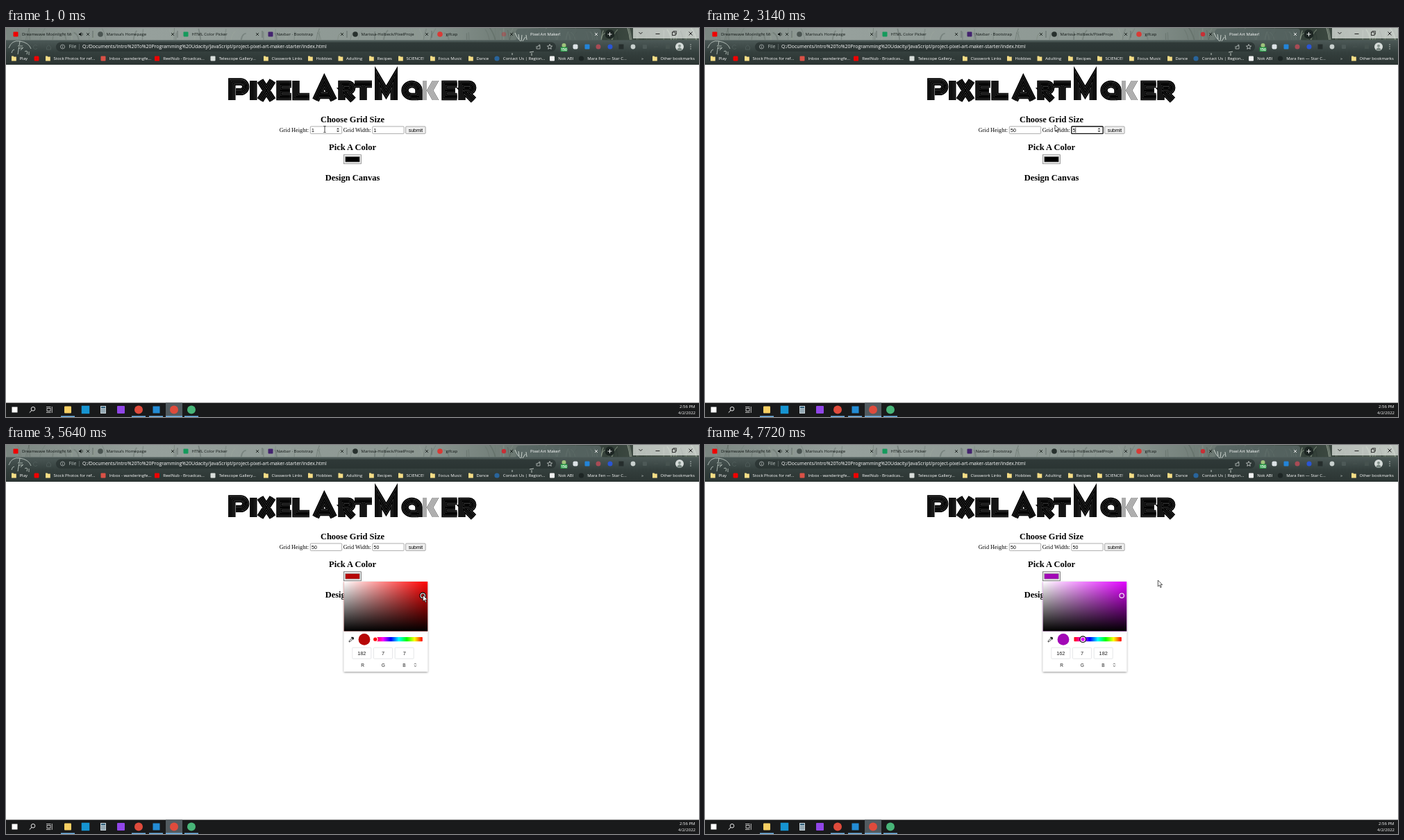
An HTML page for the animation above (7.99 s loop, 998x561 px).

```html
<!DOCTYPE html>
<html lang="en">
<head>
<meta charset="utf-8">
<title>Pixel Art Maker!</title>
<style>
html, body { margin: 0; width: 100%; height: 100%; overflow: hidden; background: #fff; }
svg { display: block; width: 100vw; height: 100vh; }
.ui { font: 6px 'Open Sans', sans-serif; }
.serif { font: 8.32px 'Liberation Serif', serif; }
.head { font: bold 12.48px 'Liberation Serif', serif; text-anchor: middle; }
.form { font: 6.93px 'Liberation Sans', sans-serif; }
.mid { text-anchor: middle; }
</style>
</head>
<body>
<svg viewBox="0 0 998 561" preserveAspectRatio="none">
  <defs>
    <linearGradient id="tabs">
      <stop offset="0" stop-color="#7b8681"/><stop offset=".2" stop-color="#96a09c"/>
      <stop offset=".6" stop-color="#8c9792"/><stop offset=".74" stop-color="#6b7872"/>
      <stop offset=".87" stop-color="#333f38"/><stop offset="1" stop-color="#59665c"/>
    </linearGradient>
    <linearGradient id="bar" x2="0" y2="1">
      <stop offset="0" stop-color="#4c5957"/><stop offset=".5" stop-color="#343f3d"/>
      <stop offset="1" stop-color="#2b3432"/>
    </linearGradient>
    <linearGradient id="white"><stop stop-color="#fff"/><stop offset="1" stop-color="#fff" stop-opacity="0"/></linearGradient>
    <linearGradient id="black" x2="0" y2="1"><stop stop-opacity="0"/><stop offset="1"/></linearGradient>
    <linearGradient id="hues">
      <stop stop-color="#f00"/><stop offset=".167" stop-color="#f0f"/><stop offset=".333" stop-color="#00f"/>
      <stop offset=".5" stop-color="#0ff"/><stop offset=".667" stop-color="#0f0"/>
      <stop offset=".833" stop-color="#ff0"/><stop offset="1" stop-color="#f00"/>
    </linearGradient>
    <filter id="shadow" x="-10%" y="-10%" width="120%" height="120%">
      <feDropShadow dx="0" dy="1" stdDeviation="1.4" flood-opacity=".45"/>
    </filter>
    <clipPath id="svArea"><rect x="486.7" y="197" width="120.5" height="71.5"/></clipPath>
  </defs>
  <g id="still"></g>
  <g id="live"></g>
</svg>
<script>
const LOOP = 7990;
const still = document.getElementById('still');
const live = document.getElementById('live');

const text = (x, y, s, cls = 'ui', fill = '#000', extra = '') =>
  `<text x="${x}" y="${y}" class="${cls}" fill="${fill}" ${extra}>${s}</text>`;
const rect = (x, y, w, h, fill, extra = '') =>
  `<rect x="${x}" y="${y}" width="${w}" height="${h}" fill="${fill}" ${extra}/>`;
const circle = (x, y, r, fill, extra = '') =>
  `<circle cx="${x}" cy="${y}" r="${r}" fill="${fill}" ${extra}/>`;
const line = (d, stroke, width = 1, extra = '') =>
  `<path d="${d}" fill="none" stroke="${stroke}" stroke-width="${width}" ${extra}/>`;
const square = (x, y, size, fill, extra) => rect(x - size / 2, y - size / 2, size, size, fill, extra);
const cross = (x, y, r, color, width = .8) =>
  line(`M${x - r} ${y - r}l${2 * r} ${2 * r}m0 ${-2 * r}l${-2 * r} ${2 * r}`, color, width);
const folder = x => `<path d="M${x} 40.5h2.6l.8 1h3.4v6h-6.8z" fill="#f6dd86"/>`;

function randomizer(seed) {
  return () => (seed = (seed * 16807) % 2147483647) / 2147483647;
}

function grass() {
  const random = randomizer(41);
  const greens = ['#3f4c45', '#56645a', '#93a18e', '#2d3833', '#a7b3a4'];
  let out = '';
  for (let i = 0; i < 130; i++) {
    const x = i < 70 ? random() * 740 : 740 + random() * 258;
    const lean = random() * 16 - 8;
    out += line(`M${x} 17q${lean / 4} -9 ${lean} ${-9 - random() * 9}`,
      greens[Math.floor(random() * 5)], .5 + random() * 1.4, `opacity="${i < 70 ? .25 : .6}"`);
  }
  return out;
}

function tabStrip() {
  const ink = '#101614';
  const tabs = [
    [14, 'Dreamwave Moonlight Mi', '#f00000', 1],
    [136, 'Marissa’s Homepage', '#4b5552', 0],
    [259, 'HTML Color Picker', '#159a5c', 1],
    [381, 'Navbar · Bootstrap', '#43236e', 1],
    [503, 'Marissa-Holbeck/PixelProje', '#27302d', 0],
    [625, 'gifcap', '#d93a35', 0]
  ];
  let out = rect(0, 0, 998, 18, 'url(#tabs)') + grass();
  tabs.forEach(([x, label, color, boxy], i) => {
    out += boxy ? square(x, 9, 7, color, 'rx="1"') : circle(x, 9, 3.8, color);
    out += text(i ? x + 8.5 : 23, 11, label, 'ui', ink) + cross(118 + 122 * i, 9, 2, ink);
    out += line(`M${125 + 122 * i} 4v10`, '#47534e', .6);
  });
  out += `<path d="M105 8h1.5l2-2v6l-2-2h-1.5z" fill="${ink}"/>` + line('M109.8 7q1.4 2 0 4', ink, .6);
  out += '<path d="M732 18q3 0 3-4V5q0-4 4-4h114q4 0 4 4v9q0 4 3 4z" fill="#586663" opacity=".85"/>';
  out += text(755, 11, 'Pixel Art Maker!', 'ui', '#fff') + cross(850, 9, 2, '#fff');
  out += circle(869.5, 9, 6.8, '#1d2623') + line('M866.5 9h6m-3-3v6', '#fff', .9);
  out += rect(903, 0, 95, 15, '#e6eae6', 'opacity=".72"');
  out += line('M911.5 6l2.5 2.5l2.5-2.5M935.5 8.5h6', '#111', .9);
  out += rect(959.5, 6, 4.5, 4.5, 'none', 'stroke="#111" stroke-width=".8"');
  return out + line('M961 6v-1.5h4.5v4.5h-1.5', '#111', .6) + cross(986, 8, 2.5, '#111', .9);
}

function toolbar() {
  let out = rect(0, 17.5, 998, 36, 'url(#bar)');
  out += rect(72, 20.5, 720, 13.5, '#27312f', 'rx="6.7" opacity=".75"');
  // Pale sketch lines of the browser theme
  out += line('M4 29q4-12 16-10q13 2 16 11M20 19l-3 19M8 36q1-5 4-5M21 32l4-4M27 34q5-3 3 4M33 34v5M17 26h7M18 29h6', '#dce5df', .7);
  out += line('M733 7q3 8 8 12M738 9l1 7M743 10l-1 9M748 13l-4 6M749 10l1 7M729 36v3M754 35l6-1M757 36v4', '#e4ebe5', .8);
  out += line('M24 27h-6m2.5-2.5l-2.5 2.5l2.5 2.5M45 26a3 3 0 1 0 0 3M58.5 27.5l3-3l3 3v3.5h-6z', '#53605d', .8);
  out += circle(81.5, 27, 3, 'none', 'stroke="#c4cbc9" stroke-width=".7"') + line('M81.5 26.5v2.2M81.5 25v.7', '#c4cbc9', .7);
  out += text(90.5, 29.4, 'File', 'ui', '#b9c1bf', 'style="font-size:6.9px"') + line('M105.5 23v8', '#7c8785', .5);
  out += text(110, 29.4, 'Q:/Documents/Intro%20To%20Programming%20Udacity/JavaScript/project-pixel-art-maker-starter/index.html',
    'ui', '#fff', 'style="font-size:6.92px"');
  out += line('M764 26v4h5v-4M765 28q0-3 4-3m-1.5-1.5l1.8 1.5l-1.8 1.5', '#cdd4d1', .7);
  out += line('M783 23.5l1 2.4l2.6.2l-2 1.7l.6 2.6l-2.2-1.4l-2.2 1.4l.6-2.6l-2-1.7l2.6-.2z', '#e1e6e4', .7);
  out += circle(803.5, 25, 3, '#9fc27c') + rect(798.5, 27.5, 10, 6.5, '#2b9c48', 'rx="1"');
  out += text(803.5, 32.8, '150', 'ui mid', '#fff', 'style="font-size:5px;font-weight:bold"');
  out += square(820, 27, 7, '#dce2e6', 'rx="2"') + square(837, 27, 7, '#2384d8', 'rx="1"');
  out += circle(853, 27, 3.5, '#a84b55') + circle(870, 27, 3.5, '#2a55d5') + square(886, 27, 7, '#252d2c');
  out += circle(903, 27, 3.4, '#c8d0ce') + square(920, 27, 6, '#4d5957', 'rx="1"') + square(953, 27, 6, '#46524f');
  out += line('M933 27h6', '#46524f', 1) + circle(970, 27, 6, '#d6dcda') + circle(970, 25.8, 2, '#85938d');
  out += '<path d="M966 31.2q4-6 8 0q-4 3-8 0z" fill="#75847e"/>';
  return out + [24, 27, 30].map(y => circle(986, y, .7, '#cfd6d3')).join('');
}

function bookmarks() {
  const folders = [[8, 'Play'], [57, 'Stock Photos for ref...'], [371, 'Classwork Links'], [435, 'Hobbies'],
    [478.5, 'Adulting'], [523, 'Recipes'], [565, 'SCIENCE!'], [611, 'Focus Music'], [666, 'Dance'], [931, 'Other bookmarks']];
  const sites = [[140, 'Inbox - wanderingfe...', '#d95146'], [217.5, 'ReelNub - Broadcas...', '#f00000'],
    [298, 'Telescope Gallery...', '#d9dedb'], [707, 'Contact Us | Region...', '#28649c'],
    [786.5, 'Nok ABI', '#f3f3f3'], [828.5, 'Mara Fen — Star C...', '#1d2524']];
  return folders.map(([x, s]) => folder(x) + text(x + 11.5, 46.1, s, 'ui', '#fff')).join('') +
    sites.map(([x, s, c], i) => (i % 2 && i > 1 ? circle(x, 44, 3.6, c) : square(x, 44, 7, c, 'rx="1"')) +
      text(x + 8.7, 46.1, s, 'ui', '#fff')).join('') +
    square(44, 44, 7, '#f00000', 'rx="1.5"') + text(915, 46, '»', 'ui', '#d5dbd8');
}

function title() {
  const letters = 'M325.3 104V77.5H338a7.2 7.2 0 0 1 0 14.4H331' +
    'M356.3 76V104M366 76L384 104M384 76L366 104M411 81H394.5V99H411M394.5 90H409M417.5 76V99H437' +
    'M446 104L458.5 77L472 104M452 97H466M483.5 104V81H493a5.2 5.2 0 0 1 0 10.4H488L500 104M502 81H527M514.5 81V104' +
    'M536.3 104V74L547.5 93L558.8 74V104M594.5 104V89.5a10 9 0 1 0-10 9.5H594' +
    'M649.5 81H632.5V99H649.5M632.5 90H647M656.5 104V81H667a5.2 5.2 0 0 1 0 10.4H661L673.5 104';
  const bands = [[10.4, '#000'], [6.8, '#777'], [6.2, '#000'], [2.6, '#666'], [2, '#000']];
  let out = '<g role="img" aria-label="Pixel Art Maker">';
  out += bands.map(([w, c]) => line(letters, c, w)).join('');
  for (let i = 0; i < 5; i++) out += line(`M${614.5 + i * 2.1} 76l-8 14l8 14`, '#444', .9);
  return out + line('M601 76v28M603 76v28M605 76v28', '#444', .9) + '</g>';
}

function page() {
  return rect(0, 53, 998, 488, '#fff') + title() +
    text(499, 135.6, 'Choose Grid Size', 'head') + text(499, 176.4, 'Pick A Color', 'head') +
    text(499, 219.8, 'Design Canvas', 'head') +
    text(393.8, 149.8, 'Grid Height:', 'serif') + text(485.8, 149.8, 'Grid Width:', 'serif') +
    rect(575.6, 142, 28.6, 10.4, '#efefef', 'rx="1.2" stroke="#767676" stroke-width=".6"') +
    text(590, 149.5, 'submit', 'form mid');
}

function taskbar() {
  const y = 550.5;
  let out = rect(0, 540.5, 998, 20.5, '#191a1b') + rect(230, 540.5, 24, 20.5, '#525b60');
  [[79, 20], [181, 20], [206, 20], [230, 24], [257, 20]].forEach(([x, w]) => out += rect(x, 559.5, w, 1.5, '#76b9ed'));
  out += square(12.5, y, 8, '#fff');
  out += circle(39, 549.3, 2.8, 'none', 'stroke="#fff" stroke-width=".9"') + line('M37 551.5l-3.2 3.2', '#fff', 1);
  out += rect(59, 548.5, 5, 4, 'none', 'stroke="#e5e5e5" stroke-width=".8"') + line('M58 546.5h6.5M58 554.5h6.5M66.3 546v9', '#e5e5e5', .8);
  out += square(89, y, 10, '#f7cf63', 'rx="1"') + square(114.5, y, 11.5, '#1694d2') + square(165.5, y, 11, '#9146e8', 'rx="1"');
  out += rect(136, 545, 8, 11, '#cbd6dc') + rect(137, 546, 6, 2.3, '#31617c');
  for (let i = 0; i < 9; i++) out += rect(137 + i % 3 * 2.2, 549.5 + Math.floor(i / 3) * 2, 1.5, 1.2, '#4b6b7c');
  out += circle(191, y, 6, '#df4b3c') + square(216.5, y, 10, '#238cd5') + circle(242, y, 6, '#df4b3c') + circle(267, y, 6, '#48b578');
  return out + text(992.5, 548.2, '2:56 PM', 'ui', '#fff', 'text-anchor="end"') +
    text(993, 557.2, '4/2/2022', 'ui', '#fff', 'text-anchor="end"');
}

// Each move: start, end, number of steps, then evenly timed waypoints.
const moves = [
  [100, 180, 2, [459, 146], [414, 142]],
  [320, 410, 2, [414, 142], [413, 139]],
  [560, 650, 2, [413, 139], [417, 139]],
  [1620, 2390, 11, [417, 139], [464, 154], [533, 144], [553, 136], [541, 146]],
  [2470, 2640, 3, [541, 146], [504, 140]],
  [3800, 4460, 9, [504, 141], [480, 163], [499.5, 190]],
  [4860, 5310, 7, [499.5, 190], [600.5, 216.5]],
  [5720, 6370, 9, [600.5, 216.5], [545.3, 280]],
  [6930, 7090, 3, [545.3, 280], [598, 226]],
  [7320, 7720, 6, [598, 226], [652.3, 195]]
];

function pointer(t) {
  const move = moves.filter(m => m[0] <= t).pop();
  if (!move) return moves[0][3];
  const [start, end, steps, ...points] = move;
  const done = Math.min(steps, Math.floor((t - start) / ((end - start) / (steps - 1)) + .001) + 1);
  const at = done / steps * (points.length - 1);
  const i = Math.min(Math.floor(at), points.length - 2);
  return points[i].map((v, axis) => v + (points[i + 1][axis] - v) * (at - i));
}

const overField = (x, [px, py]) => px > x && px < x + 46 && py > 142 && py < 153;

function field(x, value, { focused, hovered, selected, caret }) {
  let out = rect(x + .3, 142, 45.4, 10.4, '#fff',
    `rx="1" stroke="${focused ? '#101010' : '#767676'}" stroke-width="${focused ? 1.3 : .6}"`);
  if (selected) out += rect(x + 2, 143.3, 4, 8, '#0078d7');
  out += text(x + 2.1, 149.6, value, 'form', selected ? '#fff' : '#000');
  if (caret) out += line(`M${x + 2.4 + value.length * 3.85} 143.5v7.5`, '#000', .6);
  if (focused || hovered) out += `<path d="M${x + 38} 146.3l2-2.3l2 2.3zm0 1.6h4l-2 2.3z" fill="#444"/>`;
  return out;
}

const typed = (t, first, second) => t < first ? '1' : t < second ? '5' : '50';

function ring(x, y, fill, focused) {
  return (focused ? circle(x, y, 3.6, 'none', 'stroke="#000" stroke-width="2.6"') : '') +
    circle(x, y, 3.2, fill, 'stroke="#fff" stroke-width="1.1"');
}

function picker(t, rgb, color) {
  const picked = t >= 5640, shifted = t >= 6520;
  const hue = shifted ? 'hsl(293 100% 50%)' : '#f00';
  let out = rect(486.7, 197, 120.5, 129.8, '#fff', 'filter="url(#shadow)"');
  out += [hue, 'url(#white)', 'url(#black)'].map(f => rect(486.7, 197, 120.5, 71.5, f)).join('');
  out += `<g clip-path="url(#svArea)">${picked ? ring(600.2, 217.2, 'none', !shifted) : ring(486.7, 268.5, 'none', true)}</g>`;
  out += line('M494 284l.5-1.8l3.8-3.8l1.3 1.3l-3.8 3.8z', '#111', .8) + line('M497.6 277.2l3 3M499 279l1.6-1.6', '#111', 1.7);
  out += circle(516, 280.4, 8.4, color) + rect(531.5, 277, 68.3, 6.3, 'url(#hues)', 'rx=".8"');
  out += ring(shifted ? 544.2 : 531.8, 280.2, hue, shifted);
  rgb.forEach((value, i) => {
    const x = 498.8 + i * 30.7;
    out += rect(x, 292.2, 27, 16, '#fff', 'rx="1" stroke="#d5d7da" stroke-width=".6"');
    out += text(x + 13.5, 302.9, value, 'form mid', '#222', 'style="font-size:7.4px"');
    out += text(513.5 + i * 29.9, 319.5, 'RGB'[i], 'form mid', '#222', 'style="font-size:6.5px"');
  });
  return out + line('M588 316.4l1.4-1.5l1.4 1.5M588 318l1.4 1.5l1.4-1.5', '#222', .7);
}

function cursor([x, y], beam) {
  return beam
    ? line(`M${x - 1.6} ${y - 4.5}h1.1l.5.5l.5-.5h1.1M${x} ${y - 4}v8M${x - 1.6} ${y + 4.5}h1.1l.5-.5l.5.5h1.1`, '#111', .8)
    : `<path transform="translate(${x} ${y})" d="M0 0V9L2.1 7.1L3.6 10.6L5 10L3.5 6.6H6.4Z" fill="#fff" stroke="#111" stroke-width=".7"/>`;
}

function draw() {
  const t = performance.now() % LOOP;
  const at = pointer(t);
  const rgb = t < 5640 ? [0, 0, 0] : t < 6520 ? [182, 7, 7] : [162, 7, 182];
  const color = `rgb(${rgb})`;
  const open = t >= 4440;
  const overHeight = overField(438, at), overWidth = overField(527.5, at);

  let out = circle(717, 9, 3.2, '#d0262d', `opacity="${t < 100 ? .35 : t < 320 ? .6 : .9}"`);
  out += field(438, typed(t, 1140, 1310), {
    focused: t >= 100 && t < 2390, hovered: overHeight, selected: t >= 180 && t < 1140, caret: t >= 1140 && t < 1700
  });
  out += field(527.5, typed(t, 3140, 3290), {
    focused: t >= 2390 && t < 4370, selected: t >= 2550 && t < 3140, caret: t >= 3140 && t < 3800
  });
  out += rect(486.5, 182.8, 25, 13, '#efefef', `stroke="${open ? '#4f4f4f' : '#767676'}" stroke-width=".7"`);
  out += rect(488.8, 185.6, 20.4, 7.5, color, 'stroke="#777" stroke-width=".5"');
  if (open) out += picker(t, rgb, color);
  live.innerHTML = out + cursor(at, overHeight || overWidth);
  requestAnimationFrame(draw);
}

still.innerHTML = tabStrip() + toolbar() + bookmarks() + page() + taskbar();
draw();
</script>
</body>
</html>
```
